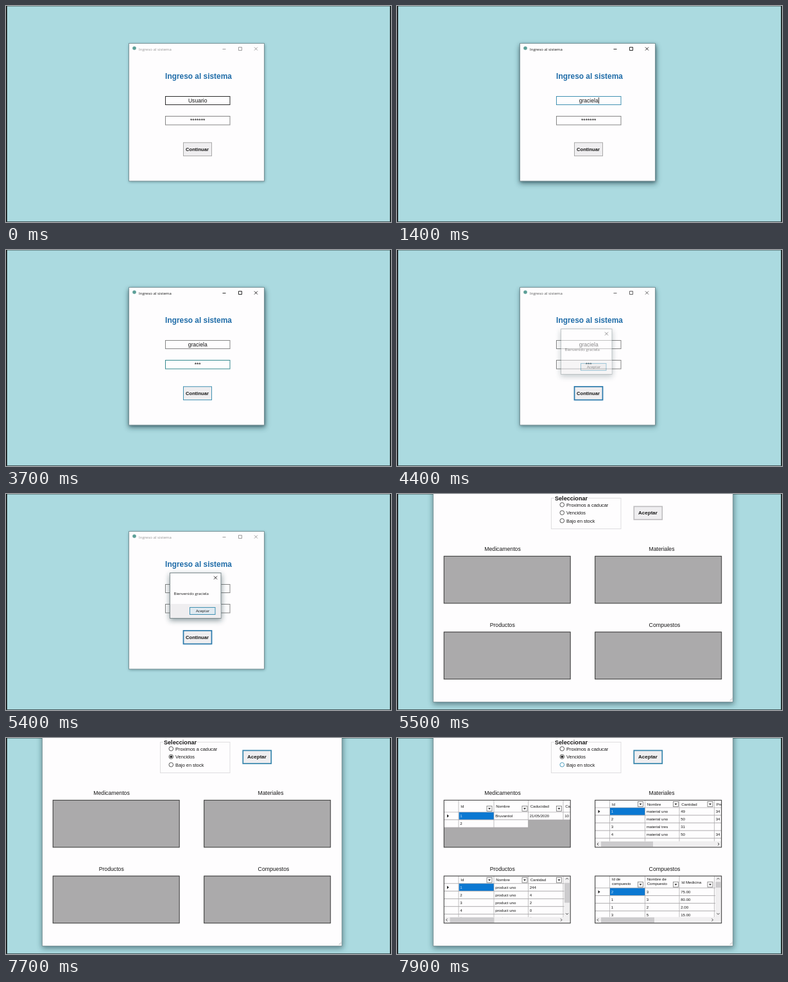
An HTML page for the animation above (8000 ms loop, 600x338 px).

```html
<!DOCTYPE html>
<html lang="es">
<head>
<meta charset="utf-8">
<title>Ingreso al sistema</title>
<style>
html, body { margin: 0; width: 100%; height: 100%; overflow: hidden; background: #abdae0; }
#stage { display: block; width: 100%; height: 100%; }
text { font-family: "Liberation Sans", Arial, sans-serif; white-space: pre; }
.ui { font-family: "Open Sans", "Noto Sans", sans-serif; }
.bold { font-weight: bold; }
</style>
</head>
<body>
<svg id="stage" viewBox="0 0 600 338">
  <defs>
    <filter id="blur" x="-20%" y="-20%" width="140%" height="140%"><feGaussianBlur stdDeviation="4"/></filter>
    <filter id="soft" x="-20%" y="-20%" width="140%" height="140%"><feGaussianBlur stdDeviation="2"/></filter>
  </defs>
</svg>
<script>
const LOOP = 8000, STEP = 100;
const GREY = '#858585', BLUE = '#4191b2', DEEP = '#2878ab', INK = '#161616';
const stage = document.getElementById('stage');

function add(parent, tag, attrs) {
  const el = document.createElementNS('http://www.w3.org/2000/svg', tag);
  set(el, attrs);
  parent.append(el);
  return el;
}
function set(el, attrs) {
  for (const k in attrs) el.setAttribute(k, attrs[k]);
}
function group(parent) { return add(parent, 'g', {}); }
function box(parent, x, y, width, height, fill, stroke = 'none', sw = 1) {
  return add(parent, 'rect', { x, y, width, height, fill, stroke, 'stroke-width': sw });
}
function path(parent, d, stroke = INK, sw = 0.9, fill = 'none') {
  return add(parent, 'path', { d, stroke, fill, 'stroke-width': sw });
}
function label(parent, x, y, str, size, more = {}) {
  const el = add(parent, 'text', { x, y, 'font-size': size, fill: INK, ...more });
  el.textContent = str;
  return el;
}
const mid = { 'text-anchor': 'middle' };
const show = (el, on) => set(el, { opacity: +on });
const ramp = (t, a, b) => Math.min(1, Math.max(0, (t - a) / (b - a)));
// Last value in a [time, value, ...] list that has started.
function at(t, list) {
  let v = list[1];
  for (let i = 0; i < list.length; i += 2) if (t >= list[i]) v = list[i + 1];
  return v;
}
function shadow(parent, x, y, w, h, filter, alpha) {
  const el = box(parent, x, y, w, h, '#17363c');
  set(el, { filter: `url(#${filter})`, opacity: alpha });
  return el;
}

// Desktop
box(stage, 0, 0, 600, 338, '#abdae0');
box(stage, 0, 0, 600, 0.7, '#54706f');

// Login window
const login = group(stage);
shadow(login, 192, 60, 211, 215, 'soft', 0.5);
const glow = shadow(login, 191, 62, 213, 216, 'blur', 0.55);
box(login, 191.5, 58.5, 211, 215.5, '#fefdfe', '#7d969b');
add(login, 'circle', { cx: 200, cy: 66, r: 2.8, fill: '#5c9f97' });
const bar = group(login);
label(bar, 207, 69.5, 'Ingreso al sistema', 6.05, { class: 'ui' });
path(bar, 'M337.5 67.5h5M362.5 64.5h5v5h-5zM387 64.5l5 5m0-5l-5 5');
label(login, 300, 114.3, 'Ingreso al sistema', 11.9, { ...mid, class: 'bold', fill: '#1f6ca8' });

function field(y, h) {
  return {
    frame: box(login, 248.5, y, 100.5, h, '#fefdfe', GREY),
    text: label(login, 298.7, y + 9.7, '', 8.6, mid),
    caret: box(login, 0, y + 1.5, 0.8, h - 3, INK),
    draw(str, color, caretOn) {
      this.text.textContent = str;
      set(this.frame, { stroke: color });
      set(this.caret, { x: 299 + this.text.getComputedTextLength() / 2 });
      show(this.caret, caretOn);
    }
  };
}
const user = field(141.5, 13);
const pass = field(172.5, 13.5);

const next = box(login, 276.5, 213.8, 44, 20.8, '#efeef0', '#a9a9a9');
label(login, 298, 226.8, 'Continuar', 7.6, { ...mid, class: 'bold' });

// Welcome dialog
const dialog = group(stage);
shadow(dialog, 255, 126, 81, 72, 'blur', 0.5);
box(dialog, 255.5, 123.5, 79.5, 71, '#fefdfe', '#7f8b8e');
box(dialog, 256, 172, 78.5, 22, '#efeef0');
path(dialog, 'M324 128.500l5 5m0-5l-5 5');
label(dialog, 261.5, 158, 'Bienvenido graciela', 6, { class: 'ui' });
const accept = box(dialog, 286.5, 177.5, 39.5, 11, '#e1e1e2', BLUE);
label(dialog, 306.5, 185.2, 'Aceptar', 5.9, { ...mid, class: 'ui' });

// Stock window
const stock = group(stage);
shadow(stock, 56, -10, 469, 339, 'blur', 0.55);
box(stock, 56.5, -5, 467, 330.5, '#fefdfe', '#81999d');
path(stock, 'M518.500 323.500l4-4M520.500 323.500l2-2', '#b5b5b5', 0.8);
box(stock, 240.5, 6.5, 108.5, 48, 'none', '#dedddf');
box(stock, 245, 4, 53, 6, '#fefdfe');
label(stock, 246, 9.8, 'Seleccionar', 9.1, { class: 'bold' });
const radios = ['Proximos a caducar', 'Vencidos', 'Bajo en stock'].map((name, i) => {
  const cy = 16.8 + i * 12.5;
  label(stock, 264, cy + 2.8, name, 7.4);
  return add(stock, 'circle', { cx: 257.3, cy, r: 3.3, fill: '#fff', stroke: '#444', 'stroke-width': 0.9 });
});
const dot = add(stock, 'circle', { cx: 257.3, cy: 29.3, r: 1.9, fill: '#222' });
const query = box(stock, 369.3, 19.5, 44, 20.5, '#efeef0', '#bdbcbe', 1.6);
label(stock, 391, 32.2, 'Aceptar', 8, { ...mid, class: 'bold' });

const COLS = [23, 78, 131.5, 186];
const W = 197, H = 74, ROW = 12;
const grids = [];

function arrow(p, x, y, angle) {
  set(path(p, 'M-2 1L0 -1L2 1', '#444', 1), { transform: `translate(${x} ${y}) rotate(${angle})` });
}
function grid(x, y, title, cx, { head, titles, rows, lastWidth = W, hbar, vbar }) {
  label(stock, cx, y - 8.2, title, 8.7, mid);
  box(stock, x, y, W, H, '#abaaab');
  const p = add(stock, 'svg', { x, y, width: W, height: H });
  const line = d => path(p, d, '#a6a5a7', 0.7);
  box(p, 0, 0, W, head, '#fefdfe');
  rows.forEach((row, r) => {
    const top = head + r * ROW, end = r === rows.length - 1 ? lastWidth : W;
    box(p, 0, top, end, ROW, '#fefdfe');
    if (!r) box(p, COLS[0] + 0.5, top, 54.5, ROW, '#0b78d2');
    line(`M0 ${top}H${end}M0 ${top + ROW}H${end}`);
    COLS.forEach((c, i) => {
      if (c <= end) line(`M${c} ${top}v${ROW}`);
      label(p, c + 2.2, top + 8.2, row[i] || '', 6.1, r || i ? {} : { fill: '#cfe6fa' });
    });
  });
  COLS.forEach((c, i) => {
    line(`M${c} 0V${head}`);
    const lines = (titles[i] || '').split('\n');
    lines.forEach((s, n) => {
      const base = lines.length > 1 ? 7.5 + n * 7.3 : head / 2 + 2.5;
      label(p, c + 3.2, base, s, 6.1);
    });
    if (i < 3) {
      box(p, c + 44, head - 9.5, 8, 8, '#fefdfe', '#777', 0.8);
      path(p, `M${c + 46} ${head - 6.5}h4l-2 2.500z`, 'none', 0, '#222');
    }
  });
  path(p, `M5 ${head + 3.5}l3 2.500l-3 2.500z`, 'none', 0, '#222');
  const right = vbar ? vbar.x : W;
  if (vbar) {
    box(p, vbar.x, 0, 10, H, '#f0eff0');
    box(p, vbar.x + 0.5, vbar.from, 8, vbar.size, '#cccbcd');
    arrow(p, vbar.x + 4.5, 4.5, 0);
    arrow(p, vbar.x + 4.5, 59.5, 180);
  }
  if (hbar) {
    box(p, 0, 64.5, W, 10, '#f0eff0');
    box(p, 9.5, 65, hbar, 8.5, '#cccbcd');
    arrow(p, 4.5, 69, -90);
    arrow(p, right - 4.5, 69, 90);
  }
  grids.push(p);
  box(stock, x + 0.2, y + 0.3, W, H - 0.3, 'none', '#333');
}

grid(73, 97, 'Medicamentos', 164.5, {
  head: 19, titles: ['Id', 'Nombre', 'Caducidad', 'Ca'], lastWidth: 131.5,
  rows: [['1', 'Bruvantiol', '21/05/2020', '10'], ['2']]
});
grid(308.5, 97, 'Materiales', 412.5, {
  head: 12, titles: ['Id', 'Nombre', 'Cantidad', 'Pre'], hbar: 81,
  rows: [['1', 'material uno', '49', '34'], ['2', 'material uno', '50', '34'],
    ['3', 'material tres', '31'], ['4', 'material uno', '50', '34'], []]
});
grid(73, 215.7, 'Productos', 164.2, {
  head: 12, titles: ['Id', 'Nombre', 'Cantidad'], hbar: 69, vbar: { x: 187.5, from: 11, size: 31 },
  rows: ['244', '4', '2', '0', '0'].map((n, i) => [String(i + 1), 'product uno', n])
});
grid(308.5, 215.7, 'Compuestos', 417, {
  head: 19, titles: ['Id de\ncompuesto', 'Nombre de\nCompuesto', 'Id Medicina'], hbar: 83,
  vbar: { x: 187.5, from: 9.5, size: 9 },
  rows: [['2', '3', '75.00'], ['1', '3', '80.00'], ['1', '2', '2.00'], ['3', '5', '15.00']]
});

// Screen edges
box(stage, 0, 0, 1.6, 338, '#050808');
box(stage, 598.5, 0, 1.5, 338, '#050808');
box(stage, 0, 337.2, 600, 0.8, '#2a3638');

const NAME = 'graciela';
const typed = [700, 0, 800, 1, 900, 2, 1000, 3, 1200, 5, 1300, 6, 1400, 8];
const stars = [0, 7, 2000, 0, 2600, 1, 2700, 2, 2800, 3];

function draw(t) {
  const active = ramp(t, 0, 400) * (1 - ramp(t, 4200, 4600));
  set(glow, { opacity: 0.55 * active });
  set(bar, { opacity: 0.45 + 0.55 * active });

  user.draw(t < 200 ? 'Usuario' : NAME.slice(0, at(t, typed)),
    at(t, [0, '#2b2b2b', 100, BLUE, 2000, GREY]), t >= 200 && t < 2000);
  pass.draw('*'.repeat(at(t, stars)),
    at(t, [0, GREY, 1800, '#2b2b2b', 2000, '#36898f', 4000, GREY]), t >= 2000 && t < 3300);
  set(next, {
    stroke: at(t, [0, '#a9a9a9', 3700, BLUE, 4000, DEEP]),
    'stroke-width': t < 4000 ? 1 : 1.7
  });

  show(dialog, 0);
  if (t < 5500) set(dialog, { opacity: ramp(t, 4200, 4600) });
  set(accept, { fill: t < 5000 ? '#e1e1e2' : '#e0eaf1' });

  show(login, t < 5500);
  show(stock, t >= 5500);
  set(radios[1], { stroke: t >= 5800 && t < 6400 ? DEEP : '#444' });
  set(radios[2], { stroke: t >= 7900 ? '#3a92b8' : '#444' });
  show(dot, t >= 6000);
  set(query, {
    stroke: at(t, [0, '#bdbcbe', 6500, '#68a9c4', 7700, '#3585ac']),
    'stroke-width': at(t, [0, 1.6, 6500, 1.1, 7700, 1.7])
  });
  grids.forEach(g => show(g, t >= 7800));
}

const start = performance.now();
function tick() {
  const t = (performance.now() - start) % LOOP;
  draw(Math.floor(t / STEP) * STEP);
  requestAnimationFrame(tick);
}
draw(0);
requestAnimationFrame(tick);
</script>
</body>
</html>
```
